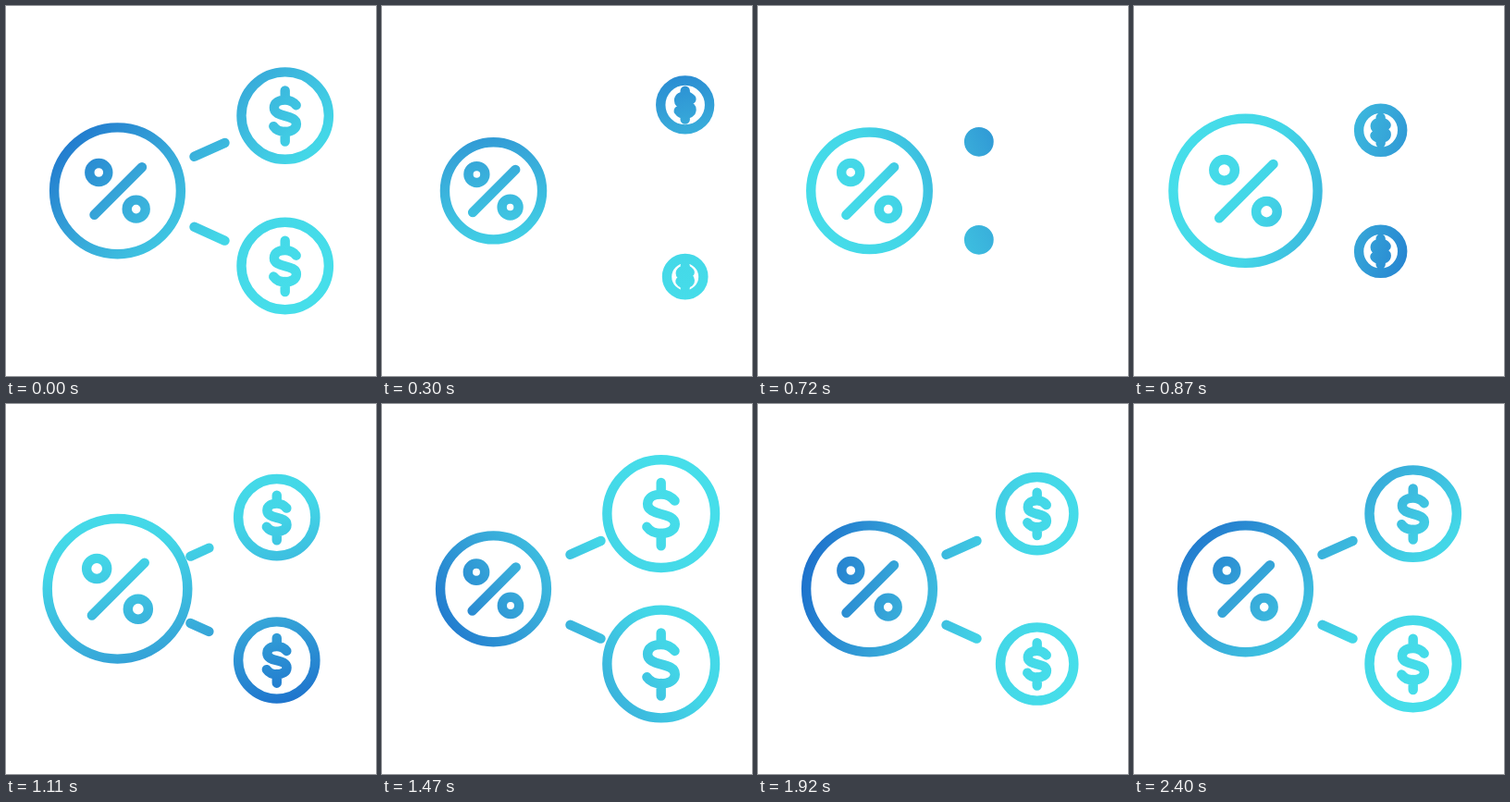
These frames come from a looping animation (400x400 px, 4.43 s). An HTML page with a canvas:

```html
<!DOCTYPE html>
<html lang="en">
<head>
<meta charset="utf-8">
<title>Percent to dollars</title>
<style>
  html, body { margin: 0; width: 100%; height: 100%; overflow: hidden; background: #fff; }
  canvas { display: block; }
</style>
</head>
<body>
<canvas id="stage" width="400" height="400"></canvas>
<script>
const ctx = document.getElementById('stage').getContext('2d');
const LOOP = 4430, END = 2400, STEP = 30;
const CX = 120.5, CY = 199.8;

const linear = u => u;
const sine = u => (1 - Math.cos(Math.PI * u)) / 2;
const softOut = u => (u + Math.sin(u * Math.PI / 2)) / 2;
const powOut = u => 1 - (1 - u) ** 2.5;

// Each key is [time, value, easing towards this key].
function track(t, keys, ease = sine) {
  if (t <= keys[0][0]) return keys[0][1];
  for (let i = 1; i < keys.length; i++) {
    const [t0, a] = keys[i - 1], [t1, b, e = ease] = keys[i];
    if (t <= t1) return a + (b - a) * e((t - t0) / (t1 - t0));
  }
  return keys[keys.length - 1][1];
}

const RING = [[0, 1], [480, .665], [960, 1.185], [1440, .838], [1920, 1]];
const PERCENT = [[0, 1], [480, .85], [960, 1.16], [1440, .915], [1920, 1]];
const REACH = [[0, 1], [240, 1.23], [510, .49], [600, .49], [1440, 1, powOut]];
const REGROW = [[600, 0], [1440, 1.24, softOut], [1920, .84], [2400, 1]];
const UPPER = [[120, 1], [510, 0], ...REGROW];
const LOWER = [[40, 1], [510, 0], ...REGROW];
const LINK = [[0, 1], [300, 0], [960, 0], [1440, 1, powOut]];
const TURN = [[0, 0], [540, 62], [870, 152], [1110, 210], [1470, 283], [1920, 328], [2160, 360]];

function gradient(degrees) {
  const a = (degrees - 135) * Math.PI / 180;
  const dx = 160 * Math.cos(a), dy = 160 * Math.sin(a);
  const g = ctx.createLinearGradient(200 + dx, 200 + dy, 200 - dx, 200 - dy);
  g.addColorStop(0, '#1b6dcb');
  g.addColorStop(.35, '#37a8d9');
  g.addColorStop(.68, '#43d6e7');
  g.addColorStop(1, '#46deea');
  return g;
}

// Scales the path only, so that line width and gradient stay fixed.
function stroke(x, y, scale, build) {
  ctx.setTransform(scale, 0, 0, scale, x, y);
  ctx.beginPath();
  build();
  ctx.resetTransform();
  ctx.stroke();
}

function circle(x, y, r) {
  ctx.moveTo(x + r, y);
  ctx.arc(x, y, r, 0, 2 * Math.PI);
}

function line(x1, y1, x2, y2) {
  ctx.moveTo(x1, y1);
  ctx.lineTo(x2, y2);
}

function percent() {
  circle(-20.2, -19.8, 10);
  circle(20.2, 19.8, 10);
  line(-25, 26, 26.5, -25.5);
}

function coin() {
  circle(0, 0, 47.2);
  line(0, -27.2, 0, -17);
  line(0, 17, 0, 28);
  ctx.moveTo(12, -11.3);
  ctx.bezierCurveTo(9, -15, 5, -17, 0, -17);
  ctx.bezierCurveTo(-6.5, -17, -11.8, -14, -11.8, -8.5);
  ctx.bezierCurveTo(-11.8, -3, -6, -1.2, 0, .3);
  ctx.bezierCurveTo(6, 1.8, 12.2, 3.5, 12.2, 9);
  ctx.bezierCurveTo(12.2, 14.5, 6.5, 17.3, 0, 17.3);
  ctx.bezierCurveTo(-5, 17.3, -10, 15, -12.4, 11.5);
}

function draw(t) {
  ctx.fillStyle = '#fff';
  ctx.fillRect(0, 0, 400, 400);
  ctx.strokeStyle = gradient(track(t, TURN, linear));
  ctx.lineWidth = 10.4;
  ctx.lineCap = ctx.lineJoin = 'round';

  stroke(CX, CY, track(t, RING), () => circle(0, 0, 68.4));
  stroke(CX, CY, track(t, PERCENT), percent);

  const reach = track(t, REACH), link = track(t, LINK);
  for (const [side, keys] of [[-1, UPPER], [1, LOWER]]) {
    const size = track(t, keys);
    if (size > .01) stroke(CX + 181.2 * reach, CY + side * 81.2 * reach, size, coin);
    if (link > .01) {
      const x1 = 193 + 10.5 * link, x2 = x1 + 33 * link;
      const y = x => 200.8 + side * (38 + (x - 203.5) * .45);
      stroke(0, 0, 1, () => line(x1, y(x1), x2, y(x2)));
    }
  }
}

let start;
function frame(now) {
  start ??= now;
  const t = (now - start) % LOOP;
  draw(Math.min(END, Math.floor(t / STEP) * STEP));
  requestAnimationFrame(frame);
}
draw(0);
requestAnimationFrame(frame);
</script>
</body>
</html>
```
